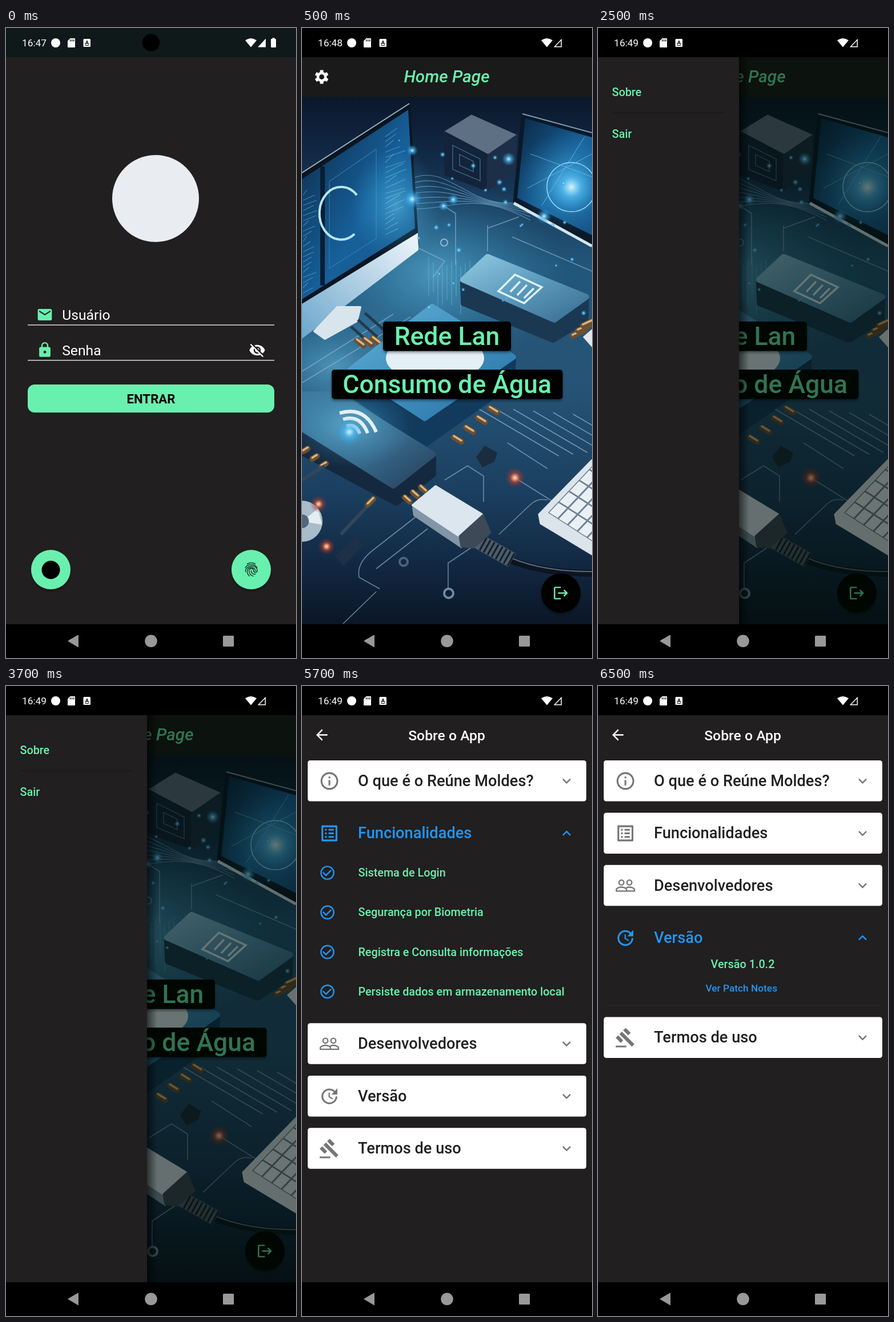
An HTML page for the animation above (8000 ms loop, 508 px wide and 1101 px high).

```html
<!DOCTYPE html>
<html lang="pt">
<head>
<meta charset="utf-8">
<title>App</title>
<style>
  html, body { margin: 0; width: 100%; height: 100%; overflow: hidden; background: #000; }
  svg { display: block; width: 508px; height: 1101px; font-family: Roboto, "Noto Sans", sans-serif; }
  .haze { mix-blend-mode: screen; }
</style>
</head>
<body>
<svg id="stage" viewBox="0 0 508 1101"></svg>
<script>
const DP = 1.236;
const GREEN = '#69f0ae', BLUE = '#2196f3', DARK = '#211f20', GREY = '#757575';

const ICONS = {
  mail: 'M20 4H4c-1.1 0-1.99.9-1.99 2L2 18c0 1.1.9 2 2 2h16c1.1 0 2-.9 2-2V6c0-1.1-.9-2-2-2zm0 4l-8 5-8-5V6l8 5 8-5v2z',
  lock: 'M18 8h-1V6c0-2.76-2.24-5-5-5S7 3.24 7 6v2H6c-1.1 0-2 .9-2 2v10c0 1.1.9 2 2 2h12c1.1 0 2-.9 2-2V10c0-1.1-.9-2-2-2zm-6 9c-1.1 0-2-.9-2-2s.9-2 2-2 2 .9 2 2-.9 2-2 2zm3.1-9H8.9V6c0-1.71 1.39-3.1 3.1-3.1 1.71 0 3.1 1.39 3.1 3.1v2z',
  hidden: 'M12 7c2.76 0 5 2.24 5 5 0 .65-.13 1.26-.36 1.83l2.92 2.92c1.51-1.26 2.7-2.89 3.43-4.75-1.73-4.39-6-7.5-11-7.5-1.4 0-2.74.25-3.98.7l2.16 2.16C10.74 7.13 11.35 7 12 7zM2 4.27l2.28 2.28.46.46C3.08 8.3 1.78 10.02 1 12c1.73 4.39 6 7.5 11 7.5 1.55 0 3.03-.3 4.38-.84l.42.42L19.73 22 21 20.73 3.27 3 2 4.27zM7.53 9.8l1.55 1.55c-.05.21-.08.43-.08.65 0 1.66 1.34 3 3 3 .22 0 .44-.03.65-.08l1.55 1.55c-.67.33-1.41.53-2.2.53-2.76 0-5-2.24-5-5 0-.79.2-1.53.53-2.2zm4.31-.78l3.15 3.15.02-.16c0-1.66-1.34-3-3-3l-.17.01z',
  back: 'M20 11H7.83l5.59-5.59L12 4l-8 8 8 8 1.41-1.41L7.83 13H20v-2z',
  logout: 'M17 7l-1.41 1.41L18.17 11H8v2h10.17l-2.58 2.58L17 17l5-5zM4 5h8V3H4c-1.1 0-2 .9-2 2v14c0 1.1.9 2 2 2h8v-2H4V5z',
  info: 'M11 7h2v2h-2zm0 4h2v6h-2zm1-9C6.48 2 2 6.48 2 12s4.48 10 10 10 10-4.48 10-10S17.52 2 12 2zm0 18c-4.41 0-8-3.59-8-8s3.59-8 8-8 8 3.59 8 8-3.59 8-8 8z',
  list: 'M19 5v14H5V5h14m1.1-2H3.9c-.5 0-.9.4-.9.9v16.2c0 .4.4.9.9.9h16.2c.4 0 .9-.5.9-.9V3.9c0-.5-.5-.9-.9-.9zM11 7h6v2h-6V7zm0 4h6v2h-6v-2zm0 4h6v2h-6zM7 7h2v2H7zm0 4h2v2H7zm0 4h2v2H7z',
  update: 'M21 10.12h-6.78l2.74-2.82c-2.73-2.7-7.15-2.8-9.88-.1-2.73 2.71-2.73 7.08 0 9.79s7.15 2.71 9.88 0C18.32 15.65 19 14.08 19 12.1h2c0 1.98-.88 4.55-2.64 6.29-3.51 3.48-9.21 3.48-12.72 0-3.5-3.47-3.53-9.11-.02-12.58s9.14-3.47 12.65 0L21 3v7.12zM12.5 8v4.25l3.5 2.08-.72 1.21L11 13V8h1.5z',
  gavel: 'M1 21h12v2H1zM5.245 8.07l2.83-2.827 14.14 14.142-2.828 2.828zM12.317 1l5.657 5.656-2.83 2.83-5.654-5.66zM3.825 9.485l5.657 5.657-2.828 2.828-5.657-5.657z',
  more: 'M16.59 8.59L12 13.17 7.41 8.59 6 10l6 6 6-6z',
  less: 'M12 8l-6 6 1.41 1.41L12 10.83l4.59 4.58L18 14z',
  check: 'M16.59 7.58L10 14.17l-3.59-3.58L5 12l5 5 8-8zM12 2C6.48 2 2 6.48 2 12s4.48 10 10 10 10-4.48 10-10S17.52 2 12 2zm0 18c-4.42 0-8-3.58-8-8s3.58-8 8-8 8 3.58 8 8-3.58 8-8 8z'
};
// Stroked icons: [path, line width]
const LINES = {
  people: ['M4.75 8.5a2.75 2.75 0 1 0 5.5 0a2.75 2.75 0 1 0-5.5 0M13.75 8.5a2.75 2.75 0 1 0 5.5 0a2.75 2.75 0 1 0-5.5 0M1.75 18.25v-2c0-1.2 3.5-2.5 5.75-2.5s5.75 1.3 5.75 2.5v2zM13.25 18.25h9v-2c0-1.2-3.5-2.5-5.75-2.5-1.2 0-2.5.3-3.5.8', 1.5],
  finger: ['M6.2 4C9.8 2 14.2 2 17.8 4M3.5 9.2C7.5 3.6 16.5 3.6 20.5 9.2M4 15.2C2.6 5.6 20.3 4 20.6 13.3c0 3.2-4.9 3.4-5.2 0c-.3-4-6.4-3.8-6.4.3c0 4 2.5 6.7 6 7.7M9.3 21.2C4.5 16.2 5.8 9.2 12 9.1c4 0 6 2.5 6 4.4M12 13.4c0 3.8 2.8 5.6 6.2 5', 1]
};

const rect = (x, y, w, h, fill, r = 0) => `<rect x="${x}" y="${y}" width="${w}" height="${h}" rx="${r}" fill="${fill}"/>`;
const dot = (x, y, r, fill, more = '') => `<circle cx="${x}" cy="${y}" r="${r}" fill="${fill}" ${more}/>`;
const oval = (x, y, rx, ry, fill, more = '') => `<ellipse cx="${x}" cy="${y}" rx="${rx}" ry="${ry}" fill="${fill}" ${more}/>`;
const poly = (pts, fill, join = 0) => `<polygon points="${pts}" fill="${fill}" stroke="${fill}" stroke-width="${join}" stroke-linejoin="round"/>`;
const line = (d, color, w, more = '') => `<path d="${d}" fill="none" stroke="${color}" stroke-width="${w}" ${more}/>`;
const text = (s, x, y, sp, fill, weight = 500, more = '') =>
  `<text x="${x}" y="${y}" font-size="${(sp * DP).toFixed(2)}" font-weight="${weight}" fill="${fill}" ${more}>${s}</text>`;
const mid = 'text-anchor="middle"';

function icon(name, cx, cy, fill, dp = 24) {
  const k = dp * DP / 24;
  const body = LINES[name]
    ? line(LINES[name][0], fill, LINES[name][1], 'stroke-linecap="round"')
    : `<path d="${ICONS[name]}" fill="${fill}"/>`;
  return `<g transform="translate(${cx - 12 * k} ${cy - 12 * k}) scale(${k})">${body}</g>`;
}

function gear(cx, cy) {
  const teeth = [0, 60, 120].map(a => `<rect x="-3" y="-12" width="6" height="24" rx="1" fill="#fff" transform="rotate(${a})"/>`).join('');
  return `<g transform="translate(${cx} ${cy})">${teeth}${dot(0, 0, 9, '#fff')}${dot(0, 0, 4.4, '#1a1a1a')}</g>`;
}

const fab = (x, y, fill) => dot(x, y, 34.5, fill, 'filter="url(#drop)"');

const gradient = (id, stops, dir = 'x2="1" y2="1"', tag = 'linearGradient') =>
  `<${tag} id="${id}" ${tag === 'linearGradient' ? dir : ''}>` + stops.map(([at, color, alpha = 1]) =>
    `<stop offset="${at}" stop-color="${color}" stop-opacity="${alpha}"/>`).join('') + `</${tag}>`;
const radial = (id, stops) => gradient(id, stops, '', 'radialGradient');

const defs = '<defs>'
  + '<filter id="drop" x="-30%" y="-30%" width="160%" height="170%"><feDropShadow dx="0" dy="3" stdDeviation="2" flood-color="#000" flood-opacity=".4"/></filter>'
  + '<clipPath id="view"><rect y="120" width="508" height="922"/></clipPath>'
  + gradient('desk', [[0, '#0b172b'], [.12, '#122b47'], [.32, '#22567b'], [.55, '#265375'], [.75, '#1b3f60'], [.9, '#11263f'], [1, '#0b1626']], 'x2="0" y2="1"')
  + gradient('screen', [[0, '#0c2742'], [.55, '#17609a'], [1, '#185487']])
  + gradient('chin', [[0, '#6ba6cc'], [1, '#f1f7fb']], 'y1="1" x2="1" y2="0"')
  + gradient('lid', [[0, '#8fc9e0'], [.5, '#5b9abc'], [1, '#386d91']])
  + gradient('hub', [[0, '#5fb0d6'], [1, '#2570a6']])
  + gradient('low', [[0, '#3c7aa0'], [.6, '#37688a'], [1, '#243f59']])
  + gradient('edge', [[0, '#000', .55], [1, '#000', 0]], 'x2="1"')
  + radial('haze', [[0, '#4c9fca', .6], [.5, '#2f7eac', .3], [1, '#1c5f90', 0]])
  + radial('glow', [[0, '#d6f5ff'], [.35, '#51baf0', .75], [1, '#238fd8', 0]])
  + radial('ember', [[0, '#ffe6cc'], [.25, '#ec8a66', .9], [.5, '#c4432e', .5], [1, '#a02a1c', 0]])
  + '</defs>';

function status(clock, full) {
  const bars = 'M441 33.5H455V18.5Z';
  return text(clock, 28, 32, 14, '#fff', 400)
    + dot(87, 26, 8, '#fff')
    + '<path d="M112.5 18H120q1 0 1 1V33q0 1-1 1H109q-1 0-1-1V22.5Z" fill="#fff"/>'
    + [112, 115, 118].map(x => rect(x, 20, 1.3, 3.5, '#000')).join('')
    + rect(135.5, 19, 12.5, 14, '#fff', 1.5)
    + text('A', 141.8, 29, 8, '#000', 700, mid) + rect(138.5, 30, 6.5, 1, '#000')
    + '<path d="M429 33.5L419 21.5Q429 14.5 439 21.5Z" fill="#fff"/>'
    + (full
      ? `<path d="${bars}" fill="#fff"/>` + rect(464, 19, 9, 15, '#fff', 1.3) + rect(466.5, 17.3, 4, 3, '#fff')
      : line('M442.5 32.7H454.2V20.5Z', '#fff', 1.5));
}

const navBar = rect(0, 1042, 508, 59, '#000')
  + poly('109,1071.3 126.3,1061.2 126.3,1081.4', '#999', 1.2)
  + dot(254, 1071.3, 10.8, '#999') + rect(380, 1062, 19.2, 19, '#999', 1.5);

function login() {
  return rect(0, 0, 508, 1042, DARK) + rect(0, 0, 508, 51, '#101919') + dot(254, 25.5, 15.3, '#000')
    + dot(262, 298, 76, '#e9edf1')
    + icon('mail', 68, 501, GREEN) + text('Usuário', 98.2, 510, 20, '#fff', 400)
    + rect(38, 518.3, 432, 1.4, '#e8e8e8')
    + icon('lock', 68, 562.5, GREEN) + text('Senha', 98.2, 571.5, 20, '#fff', 400)
    + icon('hidden', 440, 563, '#fff') + rect(38, 580, 432, 1.4, '#e8e8e8')
    + rect(38, 623, 432, 49, GREEN, 12) + text('ENTRAR', 254, 656, 18, '#000', 700, mid)
    + fab(78.5, 946.5, GREEN) + dot(78.5, 947, 16, '#000')
    + fab(429.5, 946.5, GREEN) + icon('finger', 429.5, 946.5, '#0c1a14');
}

// Soft flat rendering of a desk full of network gear
function photo() {
  let seed = 11;
  const rnd = () => (seed = seed * 16807 % 2147483647) / 2147483647;
  const glow = (x, y, r) => dot(x, y, r, 'url(#glow)');
  const ember = (x, y, r) => dot(x, y, r, 'url(#ember)');
  const haze = (x, y, rx, ry) => oval(x, y, rx, ry, 'url(#haze)', 'class="haze"');
  const plug = (x, y, dx, dy) => line(`M${x} ${y}l${dx} ${dy}`, '#6e4f30', 10, 'stroke-linecap="round"')
    + line(`M${x} ${y - 2}l${dx} ${dy}`, '#d9b683', 3.5, 'stroke-linecap="round"');
  let s = rect(0, 120, 508, 922, 'url(#desk)') + haze(235, 430, 230, 170) + haze(60, 590, 170, 110);

  for (let i = 0; i < 7; i++)
    s += line(`M195 ${262 + i * 9}C260 ${235 + i * 14} 300 ${330 - i * 8} 400 ${300 + i * 6}`, '#8cc4e2', 1.1, 'opacity=".55"');
  for (let i = 0; i < 6; i++)
    s += line(`M${300 + i * 35} ${660 + i * 3}l${150 - i * 10} ${88 - i * 6}`, '#9dbed4', 1.6, 'opacity=".65"');
  s += line('M0 600L160 500M0 620L190 505M205 385l45 22-20 28M247 310l22 14v90M325 345v45M380 330l-55 20M508 425l-140-60M250 790l40-25 28 18v45M430 770l-70-45M373 786l120 75M430 825q-18-4-30 8l-55 52M220 875l-90 70M136 980L100 960q-5-25 25-48l90-70M130 985l-58 56M256 980v-45l60-40', '#91b6cf', 1.6, 'opacity=".65"');
  for (let i = 0; i < 12; i++)
    s += line(`M${222 + i * 8} ${400 + rnd() * 30}v${50 + rnd() * 40}`, '#7fd0f2', 1, 'opacity=".45"');

  s += poly('0,253 188,132 203,378 0,500', '#0b1522', 3) + poly('0,264 186,143 198,350 0,474', 'url(#screen)');
  s += line('M36 242V450', '#0a1d33', 8);
  for (let i = 0; i < 20; i++)
    s += line(`M146 ${190 + i * 9}l${14 + rnd() * 22} ${-9 - rnd() * 8}M2 ${292 + i * 9}l${6 + rnd() * 20} -9`, '#66b9e8', 1.2, 'opacity=".55"');
  s += line('M48 268L130 212V368L48 420Z', '#378cc0', 1.2, 'opacity=".7"')
    + line('M96 292A38 46 0 1 0 92 360', '#b7e6fa', 4) + haze(165, 310, 80, 100)
    + line('M0 253L188 132', '#9bb4c5', 2) + poly('0,482 203,358 204,388 0,543', 'url(#chin)')
    + poly('22,530 62,488 102,488 96,512 40,543', '#d9e5ed', 4)
    + [0, 1, 2].map(i => line(`M${86 + i * 12} ${522 - i * 12}l34 30`, '#24394e', 5) + plug(96 + i * 14, 546 - i * 2, 12, 9)).join('');

  s += poly('250,182 297,153 376,188 326,222', '#5d7084', 3) + poly('250,182 326,222 325,284 251,256', '#13233a', 3)
    + poly('326,222 376,188 373,246 325,284', '#1c2f47', 3)
    + line('M264 205l48 24v38l-48-20zM276 221l24 12v18l-24-11z', '#3f6f92', 1.3);
  s += poly('386,151 508,184 508,381 371,305', '#0a1929', 3) + poly('391,158 508,191 508,362 377,297', 'url(#screen)')
    + line('M371 306L508 381', '#d3e6f0', 5) + line('M386 150L508 183', '#7e9bb0', 2)
    + haze(465, 270, 90, 90) + glow(472, 278, 50) + dot(472, 278, 43, 'none', 'stroke="#9bdcf6" stroke-width="1.5"')
    + line('M400 220L508 260M395 280L508 220M420 310L495 190', '#7ec9ee', 1, 'opacity=".7"');

  s += poly('282,445 440,510 498,470 497,510 440,545 283,481', '#1b3852', 10) + poly('282,440 325,400 498,470 442,510', 'url(#lid)', 10)
    + line('M373 431L420 453 389 481 344 460ZM382 443l-17 18M394 449l-17 18M406 455l-17 17', '#dff2fb', 3.5)
    + [0, 1, 2].map(i => plug(474 + i * 9, 538 - i * 9, 22, -10)).join('') + poly('492,540 508,526 508,558', '#e1e9ef');

  s += poly('85,600 215,685 370,575 368,620 215,728 86,640', '#123a5c', 10) + poly('85,597 228,487 370,575 215,682', 'url(#hub)', 10)
    + oval(233, 577, 86, 42, '#e4f0f7')
    + [0, 1, 2, 3].map(i => plug(266 + i * 21, 715 - i * 17, 13, 8)).join('');

  s += poly('0,665 160,778 230,745 230,780 165,830 0,742', '#14293f', 10) + poly('0,640 60,640 230,745 160,800 0,700', 'url(#low)', 10)
    + haze(85, 695, 110, 75)
    + line('M66 673Q110 660 130 706M72 684Q102 675 115 708M78 696Q94 691 101 709', '#e2f1f9', 6) + glow(83, 706, 25)
    + [0, 1, 2].map(i => plug(180 + i * 14, 820 - i * 9, 9, 8)).join('')
    + [0, 1, 2].map(i => plug(2 + i * 16, 740 + i * 13, 8, -5)).join('')
    + line('M118 832L68 885M40 765L0 790', '#33475a', 6) + plug(115, 833, 10, -10);
  s += poly('305,750 320,730 342,742 337,758 316,768', '#1b2c3e') + poly('60,922 94,890 106,905 72,938', '#1d3047', 3);

  s += line('M360 928Q420 953 508 953', '#0c1520', 12) + line('M366 926Q422 950 508 950', '#56687a', 2)
    + line('M300 892L368 930', '#4c5b69', 27) + line('M316 901L368 930', '#141d27', 25, 'stroke-dasharray="3 5"')
    + poly('194,838 276,888 279,908 196,852', '#8396a7', 2) + poly('194,834 234,801 315,850 276,888', '#dce6ee', 4)
    + poly('276,888 317,851 330,882 300,908 279,906', '#3d4956', 3);
  s += poly('415,850 508,755 508,920 418,866', '#dbe4eb', 3);
  for (let r = 0; r < 5; r++) for (let c = 0; c < 5; c++) {
    const x = 432 + r * 18 + c * 17, y = 847 - r * 19 + c * 11;
    s += `<path d="M${x} ${y}l16 10 17-18-16-10z" fill="#e9f0f5" stroke="#64778a" stroke-width="1.4"/>`;
  }
  s += dot(0, 862, 36, '#a9bcc9') + poly('0,862 28,840 35,868', '#e4edf2') + dot(0, 862, 12, '#526779')
    + dot(257, 988, 8, 'none', 'stroke="#6d8ca4" stroke-width="4"') + dot(178, 933, 7, 'none', 'stroke="#4b6478" stroke-width="4"')
    + dot(249, 375, 6, 'none', 'stroke="#94b9d0" stroke-width="2"');
  s += ember(43, 906, 15) + ember(29, 832, 15) + ember(373, 786, 18);
  s += glow(193, 299, 17) + glow(362, 229, 12) + glow(424, 329, 13) + glow(193, 214, 10) + glow(265, 300, 10) + glow(248, 311, 9);
  for (let i = 0; i < 28; i++) s += glow(170 + rnd() * 330, 190 + rnd() * 310, 2 + rnd() * 4);
  return `<g clip-path="url(#view)">${s}</g>`;
}

const label = (s, x, y, w) => `<g filter="url(#drop)">${rect(x, y, w, 51.5, '#000', 5)}</g>` + text(s, x + w / 2, y + 41, 36, GREEN, 500, mid);

const home = () => photo() + rect(0, 51, 508, 69.5, '#1a1a1a') + gear(34.5, 85.5)
  + text('Home Page', 253.5, 95.3, 24, GREEN, 500, mid + ' font-style="italic"')
  + label('Rede Lan', 142, 513, 224) + label('Consumo de Água', 52, 597, 404.5)
  + fab(453.5, 987.5, '#000') + icon('logout', 453.5, 987.5, GREEN);

const drawer = () => home() + rect(0, 51, 508, 991, 'rgba(0,12,4,.54)')
  + rect(247, 51, 18, 991, 'url(#edge)') + rect(0, 51, 247, 991, DARK)
  + text('Sobre', 24.5, 119, 16, GREEN) + rect(25, 147.5, 197, 1.2, '#191718') + text('Sair', 24.5, 191.5, 16, GREEN);

function tile(name, glyph, top, open) {
  const cy = top + 36, ink = open ? BLUE : '#212121', tint = open ? BLUE : GREY;
  return (open ? '' : rect(10, top, 488, 71.5, '#fff', 4.5))
    + icon(glyph, 48, cy, tint, 30) + text(name, 98, cy + 8.7, 22, ink)
    + icon(open ? 'less' : 'more', 463.5, cy, tint);
}

const TILES = [['O que é o Reúne Moldes?', 'info'], ['Funcionalidades', 'list'], ['Desenvolvedores', 'people'], ['Versão', 'update'], ['Termos de uso', 'gavel']];

const about = (tops, open, body) => rect(0, 51, 508, 991, DARK) + icon('back', 34.7, 85.5, '#fff')
  + text('Sobre o App', 253.5, 95, 20, '#fff', 500, mid)
  + TILES.map(([name, glyph], i) => tile(name, glyph, tops[i], i === open)).join('') + body;

const features = ['Sistema de Login', 'Segurança por Biometria', 'Registra e Consulta informações', 'Persiste dados em armazenamento local']
  .map((s, i) => icon('check', 44.5, 326.5 + i * 69.2, BLUE) + text(s, 98.5, 333.2 + i * 69.2, 16, GREEN)).join('');
const version = text('Versão 1.0.2', 253.5, 493, 16, GREEN, 500, mid)
  + text('Ver Patch Notes', 251.3, 534, 14, BLUE, 500, mid) + rect(14, 557.5, 480, 1.2, '#2d2b2c');

// [start ms, clock, full signal, content]
const SCENES = [
  [0, '16:47', true, login()],
  [500, '16:48', false, home()],
  [2500, '16:49', false, drawer()],
  [4500, '16:49', false, about([130, 221.5, 589.3, 681, 772.3], 1, features)],
  [6500, '16:49', false, about([130, 221.5, 312.8, 404.3, 578.5], 3, version)]
];
const LOOP = 8000;

const stage = document.getElementById('stage');
stage.innerHTML = defs + rect(0, 0, 508, 1101, '#000')
  + SCENES.map(([, clock, full, body]) => `<g class="scene" display="none">${body}${status(clock, full)}</g>`).join('') + navBar;
const groups = [...stage.querySelectorAll('.scene')];

let shown = -1;
const start = performance.now();
function draw(now) {
  const t = Math.max(0, now - start) % LOOP;
  const next = SCENES.filter(s => s[0] <= t).length - 1;
  if (next !== shown) {
    groups.forEach((g, i) => g.setAttribute('display', i === next ? 'inline' : 'none'));
    shown = next;
  }
  requestAnimationFrame(draw);
}
draw(start);
</script>
</body>
</html>
```
